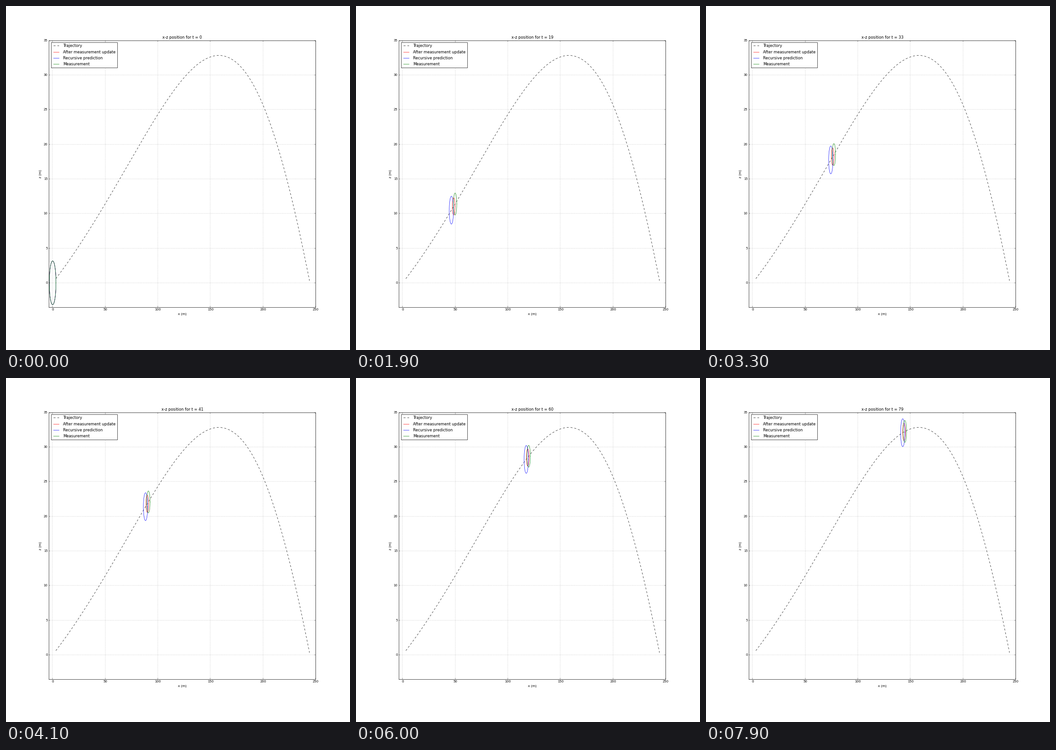
These frames come from a looping animation (748 by 748 pixels, 8000 ms). A matplotlib script:

```python
import numpy as np
import matplotlib.pyplot as plt
from matplotlib.animation import FuncAnimation
from numpy.polynomial import Polynomial

plt.style.use("classic")
plt.rcParams.update({
    "font.family": "DejaVu Sans",
    "font.size": 10.1,
    "figure.facecolor": "white",
    "savefig.dpi": "figure",
})

STEPS = 80
P0, Q, R = 10.0, 2.5, 2.5  # initial, process and measurement variance


def through(*points):
    """Polynomial passing through the given key points."""
    x, y = zip(*points)
    return Polynomial.fit(x, y, len(points) - 1)


# Height over distance, and distance over time
height = through((0, 0), (31.6, 6.87), (77.3, 18.53), (119.8, 28.67),
                 (158, 32.83), (213.3, 20), (244.2, 0.3))
distance = through((0, 3.06), (19, 49.85), (49, 103.7), (60, 119.8), (79, 144.7))


def run_filter():
    """Random-walk Kalman filter: (mean, variance) of each estimate per step."""
    start = (np.zeros(2), P0)
    history = [(start, start, start)]
    mean, var = start
    for t in range(1, STEPS):
        x = distance(t)
        seen = np.array([x, height(x)])
        gain = var / (var + R)
        post = (mean + gain * (seen - mean), (1 - gain) * var)
        history.append((post, (mean, var), (seen, R)))
        mean, var = post[0], post[1] + Q
    return history


history = run_filter()
angle = np.linspace(0, 2 * np.pi, 121)
circle = np.array([np.cos(angle), np.sin(angle)])

fig = plt.figure(figsize=(15, 15), dpi=748 / 15)
ax = fig.add_axes([0.1249, 0.1249, 0.7751, 0.7751])

xs = np.linspace(distance(0), 244.2, 300)
ax.plot(xs, height(xs), "k--", label="Trajectory")
rings = [ax.plot([], [], color, label=label)[0] for color, label in (
    ("r", "After measurement update"),
    ("b", "Recursive prediction"),
    ("g", "Measurement"))]

ax.set_xlim(-3.5, 250)
ax.set_ylim(-3.5, 35)
ax.set_xticks(range(0, 251, 50))
ax.set_yticks(range(0, 36, 5))
ax.set_xlabel("x (m)")
ax.set_ylabel("z (m)")
ax.grid(True)
ax.legend(loc="upper left")
title = ax.set_title("")


def update(t):
    title.set_text(f"x-z position for t = {t}")
    for ring, (mean, var) in zip(rings, history[t]):
        ring.set_data(*(mean[:, None] + np.sqrt(var) * circle))
    return [title, *rings]


anim = FuncAnimation(fig, update, frames=STEPS, interval=100,
                     repeat=True, repeat_delay=0, blit=False)
plt.show()
```
